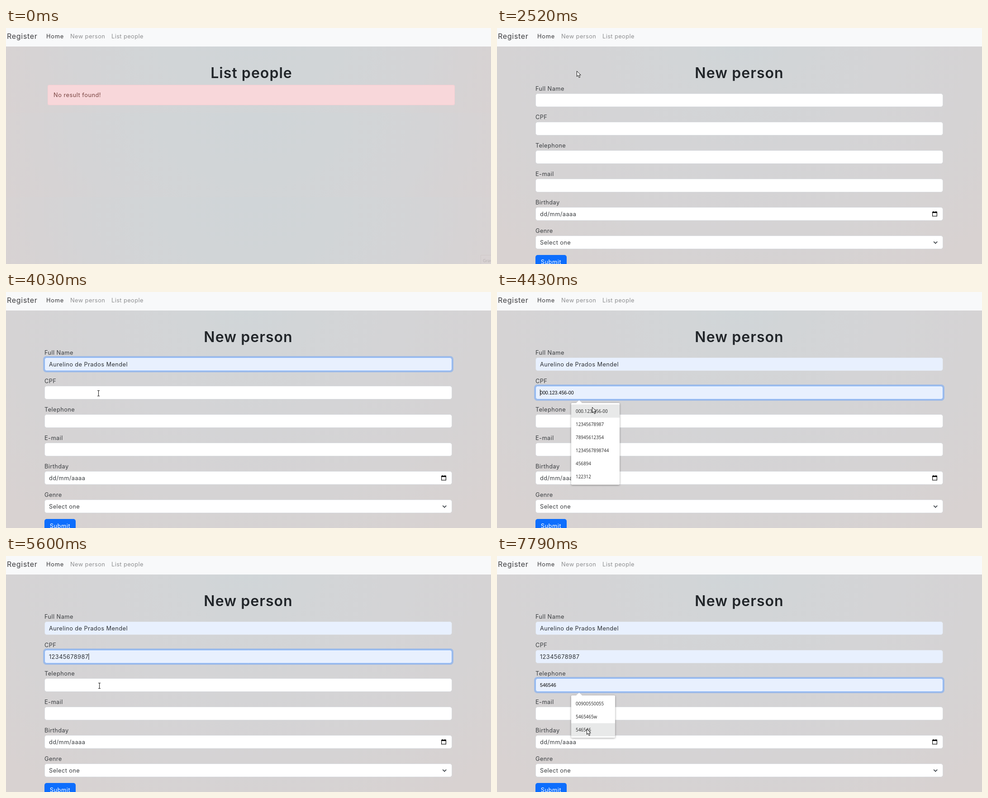
Recreate the animation shown at these times as an HTML page with a canvas. Size 1072 px wide and 523 px high, loop 8 s.

```html
<!DOCTYPE html>
<html lang="en">
<head>
<meta charset="utf-8">
<title>Register</title>
<style>
html, body { margin: 0; width: 100%; height: 100%; overflow: hidden; background: #d5d4d5; }
canvas { display: block; }
</style>
</head>
<body>
<canvas id="stage" width="1072" height="523"></canvas>
<script>
const W = 1072, H = 523, LOOP = 8000;
const ctx = document.getElementById('stage').getContext('2d');

const UI = 'Inter, sans-serif';
const MENU = '"Open Sans", "Noto Sans", sans-serif';
const SYSTEM = '"Liberation Sans", Arial, sans-serif';
const INK = '#2c3034';

const PAGE_SWAP = 1840;
const STATUS = [1500, 2310];
const FULL_NAME = 'Aurelino de Prados Mendel';
const LABELS = ['Full Name', 'CPF', 'Telephone', 'E-mail', 'Birthday', 'Genre'];

// One entry per field that gets focus, in order
const STEPS = [
  { focus: 2930, blur: 4050, open: 3070, close: 3500, width: 155, pick: FULL_NAME,
    items: [FULL_NAME, 'Aurelino', 'teste testizinho', 'Aurelino Mendel', 'amendel42@pr.example', 'Corisanda'] },
  { focus: 4050, blur: 5980, open: 4150, close: 5460, width: 107, pick: '12345678987',
    items: ['000.123.456-00', '12345678987', '78945612354', '1234567898744', '456894', '122312'] },
  { focus: 5980, blur: 9000, open: 6090, close: 9000, width: 97, pick: '',
    items: ['00900550055', '5465465w', '546546'] }
];

// Pointer keys: time, x, y
const PATH = [
  [0, 1085, 470], [70, 1074, 440], [300, 900, 330], [560, 480, 190], [830, 188, 99],
  [900, 185, 88], [1180, 170, 30], [1360, 166, 8], [1640, 163, 16],
  [2240, 163, 16], [2500, 175, 90], [2780, 183, 158], [3070, 183, 162],
  [3200, 185, 189], [3500, 186, 197], [3640, 190, 205], [3900, 202, 222], [4150, 206, 225],
  [4360, 210, 254], [4640, 210, 258], [4900, 207, 284], [5100, 206, 287],
  [6360, 206, 287], [6410, 212, 303], [6480, 218, 317], [6690, 221, 345],
  [6840, 221, 347], [7110, 222, 352], [7340, 222, 352], [7640, 200, 379], [7780, 198, 383]
];

const clamp = v => Math.max(0, Math.min(1, v));
const fieldY = i => 160 + 63 * i;

function pointerAt(t) {
  let i = 0;
  while (i < PATH.length - 1 && PATH[i + 1][0] <= t) i++;
  const a = PATH[i], b = PATH[i + 1] || a;
  const k = a === b ? 0 : clamp((t - a[0]) / (b[0] - a[0]));
  return { x: a[1] + (b[1] - a[1]) * k, y: a[2] + (b[2] - a[2]) * k };
}

function text(str, x, y, { size = 12.8, color = INK, weight = 400, font = UI, gap = 0.42, align = 'left' } = {}) {
  ctx.font = `${weight} ${size}px ${font}`;
  ctx.letterSpacing = gap + 'px';
  ctx.textAlign = align;
  ctx.fillStyle = color;
  ctx.fillText(str, x, y);
  return ctx.measureText(str).width;
}

function box(x, y, w, h, r, fill, stroke) {
  ctx.beginPath();
  ctx.roundRect(x, y, w, h, r);
  if (fill) { ctx.fillStyle = fill; ctx.fill(); }
  if (stroke) { ctx.strokeStyle = stroke; ctx.lineWidth = 1; ctx.stroke(); }
}

function line(points, color, width) {
  ctx.beginPath();
  points.forEach(([x, y]) => ctx.lineTo(x, y));
  ctx.strokeStyle = color;
  ctx.lineWidth = width;
  ctx.stroke();
}

// Elliptic glow centred on the top edge of a horizontal band
function glow(cx, top, height, radius, squash, stops) {
  ctx.save();
  ctx.beginPath();
  ctx.rect(0, top, W, height);
  ctx.clip();
  ctx.translate(cx, top);
  ctx.scale(1, squash);
  const g = ctx.createRadialGradient(0, 0, 0, 0, 0, radius);
  stops.forEach(([at, color]) => g.addColorStop(at, color));
  ctx.fillStyle = g;
  ctx.fillRect(-cx, 0, W, height / squash);
  ctx.restore();
}

function navbar(hover) {
  box(0, 0, W, 41, 0, '#f8f9fa');
  text('Register', 2, 24, { size: 16, color: '#3f3f42', gap: 0.7 });
  text('Home', 89, 23, { color: '#38383b', gap: 0.8 });
  text('New person', 142, 23, { color: hover ? '#5e5e61' : '#8e8f91' });
  text('List people', 233, 23, { color: '#8e8f91' });
}

function title(str, x) {
  text(str, x, 111, { size: 32, weight: 600, color: '#212529', gap: 1.05, align: 'center' });
}

function listPage(t) {
  for (let i = 0; i < 3; i++) {
    glow(542, i * 187.5, 188, 600, 0.75,
      [[0, '#d0d5d8'], [0.32, '#d1d5d7'], [0.66, '#d4d4d6'], [0.8, '#d6d3d4'], [1, '#d8d2d2']]);
  }
  navbar(t > 1270);
  title('List people', 542.5);
  box(92, 126, 900, 45, 4, '#f8d7da');
  box(92.5, 126.5, 899, 44, 4, null, '#f5cfd3');
  text('No result found!', 105, 153, { color: '#78433f', gap: 0.5 });
  if (t < 70) {
    ctx.globalAlpha = 0.5;
    box(1049.5, 503.5, 40, 30, 0, '#d9d3d3', '#c8c0c0');
    text('Grav', 1054, 519, { size: 9.5, color: '#958f8f', font: MENU, gap: 0 });
    ctx.globalAlpha = 1;
  }
}

function ring(i, alpha) {
  if (alpha <= 0) return;
  const y = fieldY(i);
  ctx.globalAlpha = alpha;
  box(82, y - 18, 907, 36, 7, '#9fbbe7');
  ctx.globalAlpha = 1;
}

function field(i, fill, focused) {
  box(85.5, fieldY(i) - 14.5, 900, 29, 4.5, fill, focused ? '#86b7fe' : '#dadde1');
}

function hoverIndex(step, i, t) {
  if (t < step.open || t >= step.close) return -1;
  const p = pointerAt(t);
  const n = Math.floor((p.y - (fieldY(i) + 26.3)) / 29.1);
  return n >= 0 && n < step.items.length ? n : -1;
}

function activeField(step, i, t) {
  const y = fieldY(i);
  const focused = t >= step.focus && t < step.blur;
  const done = t >= step.close;
  const preview = hoverIndex(step, i, t - 70);
  const filled = done || preview >= 0;
  ring(i, focused ? clamp((t - step.focus) / 140) : 0);
  field(i, filled ? '#e8f0fe' : '#fff', focused);
  let caretX = 95.5;
  if (done) caretX += text(step.pick, 95, y + 4.5);
  else if (preview >= 0) {
    text(step.items[preview], 95, y + 4, { size: 10.67, color: '#000', font: SYSTEM, gap: 0 });
  }
  const since = t - (done ? step.close : step.focus);
  if (focused && since % 1060 < 530) line([[caretX, y - 7], [caretX, y + 7]], '#111', 1);
}

function menu(step, i, t) {
  const alpha = Math.min(clamp((t - step.open) / 60), 1 - clamp((t - step.close) / 100));
  if (alpha <= 0) return;
  const y = fieldY(i), top = y + 23, n = step.items.length;
  ctx.save();
  ctx.globalAlpha = alpha;
  ctx.shadowColor = 'rgba(0,0,0,.38)';
  ctx.shadowBlur = 4;
  ctx.shadowOffsetY = 1;
  box(164, top, step.width, 6.5 + n * 29.1, 2, '#fff');
  ctx.shadowColor = 'transparent';
  ctx.beginPath();
  ctx.moveTo(175, top);
  ctx.lineTo(181.5, top - 6);
  ctx.lineTo(188, top);
  ctx.fill();
  const over = hoverIndex(step, i, t);
  if (over >= 0) box(164, y + 26.3 + over * 29.1, step.width, 29.1, 0, '#e8e9e9');
  step.items.forEach((item, k) => {
    text(item, 174, y + 44.5 + k * 29.1, { size: 9.9, color: '#262626', font: MENU, gap: 0 });
  });
  ctx.restore();
}

function calendarIcon() {
  ctx.fillStyle = '#111';
  ctx.fillRect(962, 407, 11, 3);
  ctx.fillRect(964, 406, 1.5, 2);
  ctx.fillRect(969.5, 406, 1.5, 2);
  ctx.strokeStyle = '#111';
  ctx.lineWidth = 1.2;
  ctx.strokeRect(962.6, 407.6, 9.8, 9.4);
}

function formPage(t) {
  glow(535, 0, H, 760, 0.85,
    [[0, '#cfd6d9'], [0.18, '#d2d5d7'], [0.45, '#d4d4d6'], [0.72, '#d5d3d4'], [1, '#d8d2d1']]);
  navbar(t < 2330);
  title('New person', 535.5);
  LABELS.forEach((label, i) => text(label, 85, fieldY(i) - 21, { color: '#3b3e41' }));
  for (let i = 3; i < 6; i++) field(i, '#fff', false);
  text('dd/mm/aaaa', 95, fieldY(4) + 4.5, { color: '#3b3e41' });
  text('Select one', 95, fieldY(5) + 4.5, { color: '#3b3e41' });
  calendarIcon();
  line([[965.2, 473.4], [969.2, 477.4], [973.2, 473.4]], '#343a40', 1.6);
  box(85, 503, 69, 30, 5, '#0d6efd');
  text('Submit', 119.5, 523, { color: '#fff', align: 'center', gap: 0.6 });
  STEPS.forEach((step, i) => activeField(step, i, t));
  STEPS.forEach((step, i) => menu(step, i, t));
}

function statusBar() {
  box(-4.5, 510.5, 178, 20, 3, '#dee1e6', '#bfc3c8');
  text('nnerhost/sections/start.php?view=add', 0, 522, { size: 9.4, color: '#3c4043', font: MENU, gap: 0 });
}

function pointer(t) {
  const p = pointerAt(t);
  const overMenu = STEPS.some((s, i) => hoverIndex(s, i, t) >= 0);
  const overField = t >= PAGE_SWAP && p.x > 85 && p.x < 986 &&
    LABELS.some((_, i) => Math.abs(p.y - fieldY(i)) < 15);
  ctx.save();
  ctx.translate(Math.round(p.x), Math.round(p.y));
  if (overField && !overMenu) {
    line([[0.5, -5], [0.5, 6]], '#111', 1);
    line([[-2, -5.5], [3, -5.5]], '#111', 1);
    line([[-2, 6.5], [3, 6.5]], '#111', 1);
  } else {
    ctx.translate(0.5, 0.5);
    ctx.beginPath();
    [[0, 0], [0, 12], [2.8, 9.4], [4.8, 14.4], [7, 13.5], [5, 8.7], [8.8, 8.7]]
      .forEach(([x, y]) => ctx.lineTo(x, y));
    ctx.closePath();
    ctx.fillStyle = '#fff';
    ctx.fill();
    ctx.strokeStyle = '#111';
    ctx.lineWidth = 1;
    ctx.stroke();
  }
  ctx.restore();
}

function draw(t) {
  ctx.clearRect(0, 0, W, H);
  if (t < PAGE_SWAP) listPage(t);
  else formPage(t);
  if (t >= STATUS[0] && t < STATUS[1]) statusBar();
  pointer(t);
}

const start = performance.now();
function tick() {
  draw((performance.now() - start) % LOOP);
  requestAnimationFrame(tick);
}
tick();
</script>
</body>
</html>
```
